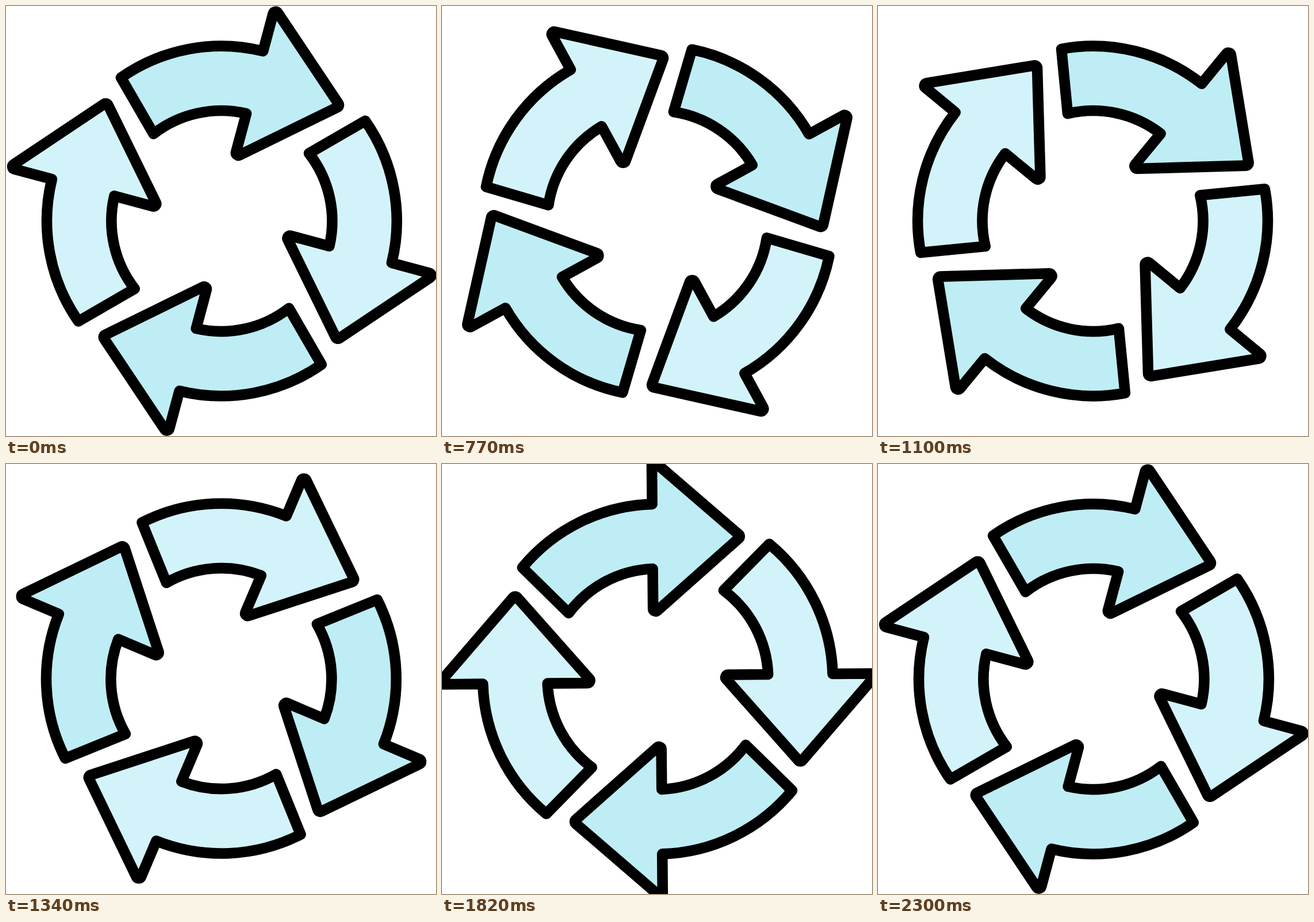
Animation of 748 by 748 pixels, one loop 2.33 s. Source, as an HTML page:

```html
<!DOCTYPE html>
<html lang="en">
<head>
<meta charset="utf-8">
<title>Turning arrows</title>
<style>
  html, body { margin: 0; width: 100%; height: 100%; overflow: hidden; background: #fff; }
  svg { display: block; width: 100vw; height: 100vh; }
  path { stroke: #000; stroke-width: 18.6; stroke-linejoin: round; }
</style>
</head>
<body>
<svg viewBox="0 0 748 748"><g id="wheel"></g></svg>
<script>
const LOOP = 2330, HOLD = 500, STEP = 30, STEPS = 60;
const PIVOT = [374.4, 374.1];
const TILT = 15;
const wheel = document.getElementById('wheel');

// One arrow around the origin, with the base of its head upright.
function arrowPath() {
  const r = 4.5, outer = 304.4, inner = 192;
  const top = [-1.7, -372], tip = [141, -246.9], low = [-1.7, -122.4];
  const pt = (x, y) => x.toFixed(2) + ' ' + y.toFixed(2);
  const arc = (radius, sweep) => `A${radius} ${radius} 0 0 ${sweep} `;
  const side = (a, b) => {
    const dx = b[0] - a[0], dy = b[1] - a[1], len = Math.hypot(dx, dy);
    return [dy / len * r, -dx / len * r];
  };
  const off = (p, n) => pt(p[0] + n[0], p[1] + n[1]);
  const back = [-r, 0], n1 = side(top, tip), n2 = side(tip, low);
  return 'M' + pt(-233, -195.9) +
    arc(outer, 1) + pt(-6.2, -304.3) +
    'L' + off(top, back) + arc(r, 1) + off(top, n1) +
    'L' + off(tip, n1) + arc(r, 1) + off(tip, n2) +
    'L' + off(low, n2) + arc(r, 1) + off(low, back) +
    'L' + pt(-6.2, -191.9) + arc(inner, 0) + pt(-153, -116) + 'Z';
}

const shape = arrowPath();
for (let i = 0; i < 4; i++) {
  const pale = i % 2;
  const path = document.createElementNS('http://www.w3.org/2000/svg', 'path');
  path.setAttribute('d', shape);
  path.setAttribute('fill', pale ? '#d3f3fa' : '#beedf5');
  path.setAttribute('transform', `translate(${pale} 0) rotate(${TILT + 90 * i})`);
  wheel.append(path);
}

// Cubic Bézier easing with flat ends.
function ease(x) {
  const a = 0.29, b = 0.18;
  let lo = 0, hi = 1;
  for (let i = 0; i < 30; i++) {
    const s = (lo + hi) / 2, q = 1 - s;
    if (3 * a * s * q * q + 3 * b * s * s * q + s * s * s < x) lo = s;
    else hi = s;
  }
  return lo * lo * (3 - 2 * lo);
}

function draw(ms) {
  const step = Math.max(0, Math.floor((ms % LOOP - HOLD) / STEP));
  const angle = 360 * ease(Math.min(1, step / STEPS));
  wheel.setAttribute('transform', `translate(${PIVOT}) rotate(${angle.toFixed(3)})`);
}

const start = performance.now();
function tick() {
  draw(performance.now() - start);
  requestAnimationFrame(tick);
}
tick();
</script>
</body>
</html>
```
